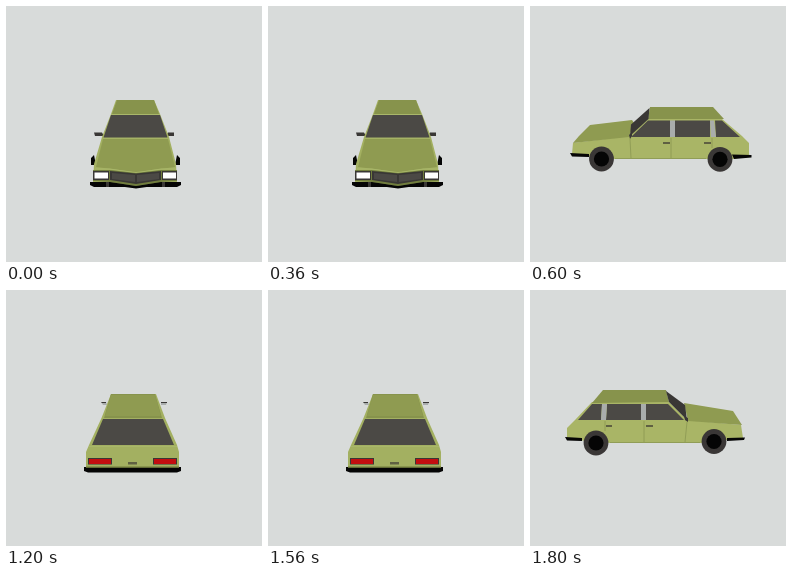
An HTML page for the animation above (2.4 s loop, 256 by 256 pixels).

```html
<!DOCTYPE html>
<html lang="en">
<head>
<meta charset="utf-8">
<title>Turning car</title>
<style>
html, body { margin: 0; width: 100%; height: 100%; overflow: hidden; background: #d8dbda; }
svg { display: block; width: 100%; height: 100%; }
.view { visibility: hidden; animation: show 2400ms step-end infinite; }
.right { animation-delay: -1800ms; }
.back { animation-delay: -1200ms; }
.left { animation-delay: -600ms; }
@keyframes show {
  0% { visibility: visible; }
  25%, 100% { visibility: hidden; }
}
.body { fill: #a3b061; }
.lit { fill: #a9b566; }
.mid { fill: #8f9b51; }
.roof { fill: #87934c; }
.dim { fill: #707d3d; }
.glass { fill: #4b4945; }
.dark { fill: #393735; }
.black { fill: #050505; }
.tire { fill: #3a3736; }
.post { fill: #a9adac; }
.grip { fill: #5f6042; }
.lamp { fill: #fff; }
.stop { fill: #c20d10; }
.line { fill: none; stroke: #8b9752; stroke-width: .8; }
.edge { fill: none; stroke: #a9b76a; stroke-width: 1; }
</style>
</head>
<body>
<svg viewBox="0 0 256 256">
  <defs>
    <g id="wheel">
      <circle class="tire" r="12.4"/>
      <circle class="black" r="7.6"/>
    </g>
  </defs>

  <g class="view front">
    <path class="black" d="M88 149L85 152V159H90ZM171 149L174 152V159H169ZM84 176H175V179L171 181H88L84 179Z"/>
    <path class="dark" d="M88 126.500H96L98 130H89ZM168 126.500H162L160 130H168Z"/>
    <path class="body" d="M110 94H148L154 108L163 131L170 158L171 176L155 177L130 181L104 177L87 176L88 158L96 131L105 108Z"/>
    <path class="roof" d="M111 94H148L153 108H106Z"/>
    <path class="mid" d="M97 133H162L169 161L130 166L90 161Z"/>
    <path class="edge" d="M105 108.500H154M97 132H162M89 163L104 163L130 167L155 163H170"/>
    <path class="glass" d="M105 109H154L161.500 131.500H97.500Z"/>
    <path class="dim" d="M87 164H104L130 167L155 164H171V175L155 176L130 180L104 176L87 175Z"/>
    <path class="dark" d="M104 165L130 167.500L155 165V174L130 178L104 174Z"/>
    <path class="glass" d="M106 167L129 169V176L106 173ZM131 169L153 167V173L131 176Z"/>
    <path class="dark" d="M87 165H103V174H87ZM156 165H171V174H156Z"/>
    <path class="lamp" d="M88.500 166.500H102V172.500H88.500ZM157 166.500H170V172.500H157Z"/>
    <path class="black" d="M84 176H104L130 180L155 176H175V178L155 179L130 182.500L104 179L84 178Z"/>
    <path class="dark" d="M100 176H103V181H100ZM156 176H159V181H156Z"/>
  </g>

  <g class="view right">
    <path class="lit" d="M43 137L99 130L118 113H192L212 130L219 137V150L203 153H84L42 148Z"/>
    <path class="mid" d="M60 119L102 114L104 117L99 131L43 137L49 130Z"/>
    <path class="roof" d="M120 101H183L194 113H118Z"/>
    <path class="dark" d="M119.500 102L118.500 113L100 130L101 118.500Z"/>
    <path class="glass" d="M118 114.500H140V131H101ZM145 114.500H180V131H145ZM185 114.500H192L210 131H186Z"/>
    <path class="post" d="M140 114.500H145V131H140ZM180 114.500H184L186 131H181Z"/>
    <path class="dark" d="M99 129L102 126V130L100 133Z"/>
    <path class="grip" d="M133 136H140V138H133ZM174 136H181V138H174Z"/>
    <path class="line" d="M100 133L101 152M141 132V152M182 132V142M85 152.500H176"/>
    <path class="black" d="M40 147L59 148V151L42 150.500ZM202 148.500L221.500 149V151.500L204 153Z"/>
    <use href="#wheel" x="71.5" y="153"/>
    <use href="#wheel" x="190" y="153.300"/>
  </g>

  <g class="view back">
    <path class="black" d="M78 177H175V181L171 182.500H82L78 181Z"/>
    <path class="post" d="M95 112H100L101 115H97ZM155 112H161L160 115H155Z"/>
    <path class="dark" d="M95 112H100V113H96ZM155 112H161V113H155Z"/>
    <path class="body" d="M105 104H150L159 128L171 155L173 162V177.500H80V162L83 155L95.500 128Z"/>
    <path class="roof" d="M105 104H149L156 128H98Z"/>
    <path class="mid" d="M105 105H149L155 126H99Z"/>
    <path class="glass" d="M97 129H157L168 155H86Z"/>
    <path class="edge" d="M83 156.500H171"/>
    <path class="dark" d="M82 168H106V174.500H82ZM147 168H171V174.500H147Z"/>
    <path class="grip" d="M122 172H131V174.500H122Z"/>
    <path class="stop" d="M83 169H105V174H83ZM148 169H170V174H148Z"/>
    <path class="dim" d="M80 176.500H173V177.500H80Z"/>
  </g>

  <g class="view left">
    <path class="lit" d="M62 112H139L157 130L211 135L213 148L172 153H80L37 149V138L45 130Z"/>
    <path class="mid" d="M154 113L203 121L212 135L158 131Z"/>
    <path class="roof" d="M73 100H136L139 112L62 113Z"/>
    <path class="dark" d="M136 101L155 115L157 130L139 112Z"/>
    <path class="glass" d="M62 114H72L71 130H48ZM77 114H111V130H76ZM116 114H138L154 130H116Z"/>
    <path class="post" d="M72 114H77L76 130H71ZM111 114H116V130H111Z"/>
    <path class="dark" d="M154 126L158 128V132L155 130Z"/>
    <path class="grip" d="M76 135H82V137H76ZM116 135H123V137H116Z"/>
    <path class="line" d="M75 131V141M114 131V152M157 132L155 152M80 152.500H170"/>
    <path class="black" d="M35 147L52 148V151L37 150.500ZM197 148L215 147.500L214 150L197 151Z"/>
    <use href="#wheel" x="66" y="153"/>
    <use href="#wheel" x="184" y="151.500"/>
  </g>
</svg>
</body>
</html>
```
